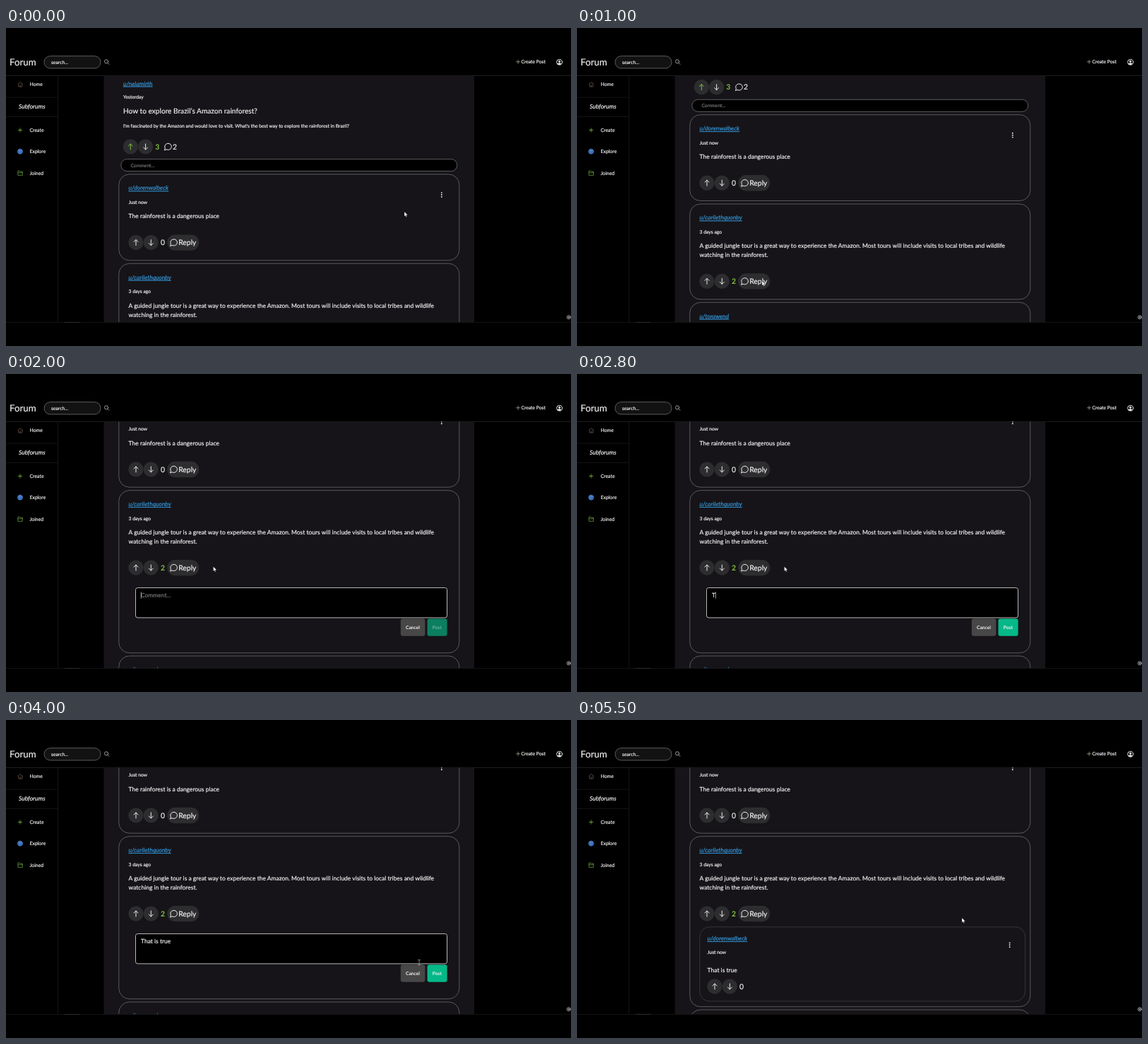
Write an HTML page that moves like this. It is 800 px wide and 450 px high and loops after 5.6 s.

```html
<!DOCTYPE html>
<html lang="en">
<head>
<meta charset="utf-8">
<title>Forum</title>
<style>
  html, body { margin: 0; width: 100%; height: 100%; overflow: hidden; background: #000; }
  svg { display: block; width: 800px; height: 450px; }
  text {
    font-family: Lato, sans-serif; white-space: pre; text-rendering: geometricPrecision;
    color: #f2f2f2; fill: currentColor; stroke: currentColor; stroke-width: .18;
  }
  .name { font-style: italic; color: #3498db; text-decoration: underline; }
  .italic { font-style: italic; }
  .bold { font-weight: 700; stroke: none; }
  .score { font-weight: 700; color: #84c441; stroke: none; }
  .hint { color: #777; }
  .line { fill: none; stroke: #eee; stroke-width: 1; stroke-linecap: round; stroke-linejoin: round; }
  .green { stroke: #7cc243; }
  .card { fill: none; stroke: #58585b; stroke-width: 1; }
  .pill { fill: #000; stroke: #666; stroke-width: .9; }
  .button { fill: #2d2d2f; }
  .rule { stroke: #191919; stroke-width: .8; }
</style>
</head>
<body>
<svg viewBox="0 0 800 450">
  <defs>
    <clipPath id="view"><rect y="67.5" width="800" height="349"/></clipPath>
    <path id="up" d="M0 4V-4M-3-1 0-4 3-1"/>
    <path id="bubble" d="M-4.6 4.6-3.9 2.1A4.8 4.6 0 1 1-1.9 4Z"/>
    <g id="kebab" fill="#f2f2f2"><circle cy="-2.9" r=".95"/><circle r=".95"/><circle cy="2.9" r=".95"/></g>
  </defs>
  <g id="chrome"></g>
  <g clip-path="url(#view)">
    <rect x="138.5" y="67" width="524.5" height="350" fill="#161418"/>
    <g id="page"></g>
  </g>
  <path class="rule" d="M0 416.5H800"/>
  <path d="M83 416.5H104" stroke="#333" stroke-width=".8"/>
  <g id="cursor">
    <path id="arrow" d="M0 0V6.6L1.6 5.2 2.6 7.5 3.7 7 2.7 4.8H4.8Z" fill="#fff" stroke="#000" stroke-width=".3"/>
    <path id="beam" class="line" d="M-1.3-3.5H1.3M0-3.5V3.5M-1.3 3.5H1.3" style="stroke:#aaa;stroke-width:.7"/>
  </g>
</svg>
<script>
const LOOP = 5600, FRAME = 100;
const SMALL = 6.77, BODY = 8.47, LARGE = 10.4;
const REPLY = 'That is true';
const OPEN = 1100, FOCUS = 1600, FIRST_KEY = 2700, NEXT_KEY = 2900, LAST_KEY = 3500, POSTED = 4800;
const $ = id => document.getElementById(id);

// y is the middle of the capital letters
const label = (x, y, size, str, cls = '', extra = '') =>
  `<text x="${x}" y="${(y + size * .36).toFixed(2)}" font-size="${size}" class="${cls}" ${extra}>${str}</text>`;
const box = (x, y, w, h, r, cls, extra = '') =>
  `<rect x="${x}" y="${y}" width="${w}" height="${h}" rx="${r}" class="${cls}" ${extra}/>`;
const icon = (id, x, y, cls = '', turn = 0) =>
  `<use href="#${id}" class="line ${cls}" transform="translate(${x} ${y}) rotate(${turn})"/>`;
const votes = (x, y, liked = false) =>
  `<circle cx="${x}" cy="${y}" r="10.6" class="button"/><circle cx="${x + 21.3}" cy="${y}" r="10.6" class="button"/>` +
  icon('up', x, y, liked ? 'green' : '') + icon('up', x + 21.3, y, '', 180);
const byline = (x, y, user, date, gap = 20) =>
  label(x, y, BODY, user, 'name') + label(x, y + gap, SMALL, date);
const actions = (y, count, cls) =>
  votes(184, y) + label(219, y, LARGE, count, cls) + box(228.3, y - 11.2, 45, 22.4, 11.2, 'button') +
  icon('bubble', 237.3, y) + label(244.2, y, LARGE, 'Reply');

$('chrome').innerHTML =
  label(5, 48.3, 13.3, 'Forum') + box(54, 39.7, 80, 17.3, 8.6, 'pill', 'style="fill:#121212"') +
  label(64, 48.3, SMALL, 'search...') +
  `<g class="line" style="stroke:#bbb;stroke-width:.8"><circle cx="142" cy="47.4" r="2.6"/><path d="M144 49.4 146 51.4"/></g>
   <path class="line" d="M722.5 47.8H727.7M725.1 45.2V50.4" style="stroke:#9aa88a;stroke-width:.8"/>` +
  label(729.4, 48, SMALL, 'Create Post') +
  `<circle cx="783.6" cy="48.3" r="3.9" class="line"/><circle cx="783.6" cy="47.2" r="1.5" fill="#eee"/>
   <path d="M780.9 50.8Q783.6 47.9 786.3 50.8Q783.6 53.4 780.9 50.8" fill="#eee"/>
   <path d="M0 67.3H800" stroke="#262626" stroke-width=".9"/>
   <path class="rule" d="M0 98.2H73.5M0 125.5H73.5M73.5 67V417"/>
   <g class="line" style="stroke-width:.8">
     <path d="M17 79.4 20.2 76.6 23.4 79.4M17.8 79.4V83H22.8V79.4M20.2 83V80.6" stroke="#705448"/>
     <path class="green" d="M17.4 144.5H22.6M20 141.9V147.1"/>
     <circle cx="20" cy="174.7" r="3.5" fill="#3268b5" stroke="#4a82d0"/>
     <path d="M17.4 173.5Q20 175.2 22.6 173.2M19 177.5Q20.8 175.2 19.6 171.6" stroke="#78a5dc" stroke-width=".5"/>
     <path d="M16.9 208V202.2H19.4L20.3 203.2H23.3V208ZM16.9 204.8H23.3" stroke="#65983c"/>
   </g>` +
  label(33.5, 79.7, 6.88, 'Home') + label(18, 110.8, BODY, 'Subforums', 'italic') +
  label(33.5, 144.5, 6.88, 'Create') + label(33.5, 174.8, 6.88, 'Explore') + label(33.5, 205.2, 6.88, 'Joined') +
  `<circle cx="796.8" cy="409.3" r="2.5" class="line" style="stroke:#ccc;stroke-width:.8"/><circle cx="796.8" cy="409.3" r="1.1" fill="#ccc"/>`;

const post = byline(166, 78.5, 'u/nelamirth', 'Yesterday', 19.2) +
  label(166, 117.6, 10.15, 'How to explore Brazil’s Amazon rainforest?') +
  label(166, 139, SMALL, "I'm fascinated by the Amazon and would love to visit. What's the best way to explore the rainforest in Brazil?") +
  votes(176.3, 168, true) + label(211.2, 168, LARGE, '3', 'score') +
  icon('bubble', 229.2, 168) + label(236, 168, LARGE, '2') +
  box(162.8, 185.6, 476, 17, 8.5, 'pill') + label(176.4, 194.2, SMALL, 'Comment...', 'hint');

const first = box(159.8, 207, 482, 121.8, 15, 'card') + byline(173.6, 226.4, 'u/dorenwalbeck', 'Just now') +
  '<use href="#kebab" x="616.8" y="236"/>' +
  label(173.6, 266.4, BODY, 'The rainforest is a dangerous place') + actions(303.6, '0');

const editor = `<g id="editor">${box(183.5, 471.1, 441, 42.4, 3, '', 'id="field" fill="#000"')}` +
  label(191, 481.6, BODY, 'Comment...', 'hint', 'id="hint"') + label(191, 481.6, BODY, '', '', 'id="typed"') +
  '<path id="caret" d="M191.3 477V486.3" stroke="#eee" stroke-width=".7"/>' +
  box(558.8, 514.8, 34.6, 24.6, 3, '', 'fill="#474748"') + label(566, 527.1, 6.7, 'Cancel', 'bold') +
  box(596.5, 514.8, 28.1, 24.6, 3, '', 'id="send"') + label(603.8, 527.1, 6.7, 'Post', 'bold', 'id="sendLabel"') + '</g>';

const answer = '<g id="answer">' + box(173.8, 461.4, 460.8, 105.2, 14, 'card', 'style="stroke:#343437"') +
  byline(184.6, 477.7, 'u/dorenwalbeck', 'Just now', 19.6) + '<use href="#kebab" x="612.6" y="486.9"/>' +
  label(184.6, 522.4, BODY, REPLY) + votes(195, 545.7) + label(230, 545.7, LARGE, '0') + '</g>';

const second = box(159.8, 333.3, 482, 135, 15, 'card', 'id="second"') +
  byline(173.6, 352.7, 'u/carilethquonby', '3 days ago') +
  label(173.6, 392.7, BODY, 'A guided jungle tour is a great way to experience the Amazon. Most tours will include visits to local tribes and wildlife') +
  label(173.6, 405.6, BODY, 'watching in the rainforest.') + actions(442.7, '2', 'score') + editor + answer;

const third = `<g id="third">${box(159.8, 472.6, 482, 140, 15, 'card')}${byline(173.6, 492, 'u/torawend', '3 days ago')}</g>`;

$('page').innerHTML = post + first + second + third;

const scrollPath = [[100, 0], [400, 84.3], [1500, 84.3], [1800, 168.6]];
const cursorPath = [
  [0, 564, 260], [400, 311, 261], [800, 262, 358], [1100, 262, 358], [1300, 295, 362], [1600, 295, 362],
  [1900, 293.5, 272.5], [3600, 293.5, 272.5], [4000, 585, 343], [4300, 610, 360], [4700, 610, 360], [5300, 545, 280]
];

// Eased position along a list of [time, ...values]
function along(path, t) {
  const i = path.findIndex(key => key[0] > t);
  if (i < 0) return path.at(-1).slice(1);
  if (i === 0) return path[0].slice(1);
  const [t0, ...from] = path[i - 1], [t1, ...to] = path[i];
  const p = (t - t0) / (t1 - t0), eased = p * p * (3 - 2 * p);
  return from.map((v, k) => v + (to[k] - v) * eased);
}

const show = (id, on) => $(id).setAttribute('display', on ? 'inline' : 'none');

function render(t) {
  const [scroll] = along(scrollPath, t), [x, y] = along(cursorPath, t);
  const editing = t >= OPEN && t < POSTED, posted = t >= POSTED, focused = t >= FOCUS;
  $('page').setAttribute('transform', `translate(0 ${-scroll})`);

  const height = posted ? 241 : editing ? 230 : 135;
  $('second').setAttribute('height', height);
  $('third').setAttribute('transform', `translate(0 ${height - 135})`);
  show('editor', editing);
  show('answer', posted);

  const count = t < FIRST_KEY ? 0 : t < NEXT_KEY ? 1 : Math.min(REPLY.length, 2 + Math.floor((t - NEXT_KEY) / 55));
  $('typed').textContent = REPLY.slice(0, count);
  show('hint', !count);
  $('field').setAttribute('stroke', focused ? '#b8b8b8' : '#666');
  $('send').setAttribute('fill', count ? '#05b888' : '#0b7f60');
  $('sendLabel').style.color = count ? '#f2f2f2' : '#6fae9b';

  const lastInput = t < FIRST_KEY ? FOCUS : t < NEXT_KEY ? FIRST_KEY : Math.min(t, LAST_KEY);
  show('caret', focused && Math.floor((t - lastInput) / 500) % 2 === 0);
  const width = editing && count ? $('typed').getComputedTextLength() : 0;
  $('caret').setAttribute('transform', `translate(${width} 0)`);

  const overField = editing && focused && t > 1900 && y > 302 && y < 345;
  $('cursor').setAttribute('transform', `translate(${x} ${y})`);
  show('arrow', !overField);
  show('beam', overField);
}

const start = performance.now();
function tick() {
  const t = (performance.now() - start) % LOOP;
  render(Math.floor(t / FRAME) * FRAME);
  requestAnimationFrame(tick);
}
tick();
</script>
</body>
</html>
```
